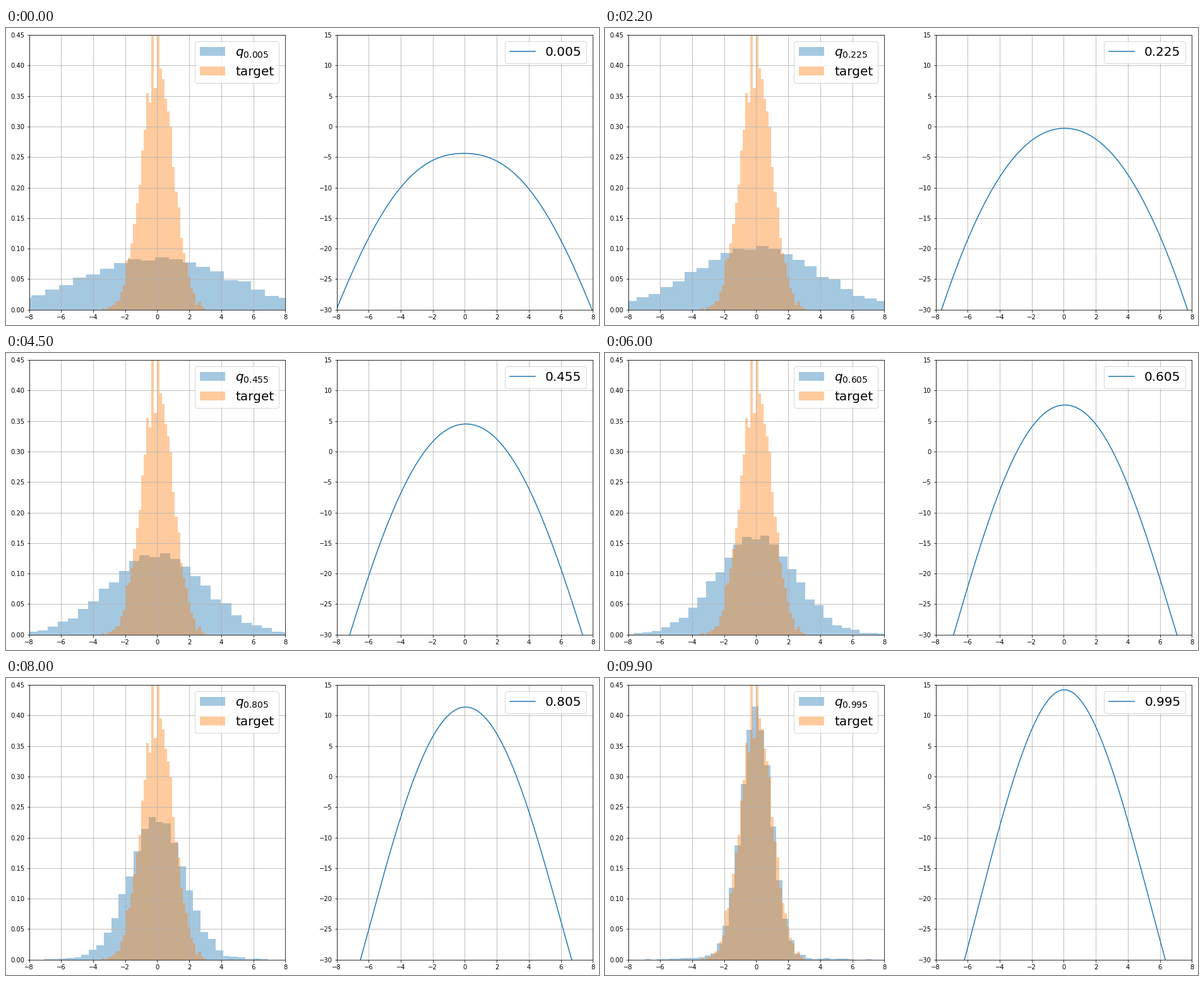
These frames come from a looping animation (939 by 470 pixels, 10000 ms). A matplotlib script:

```python
import numpy as np
import matplotlib.pyplot as plt
from matplotlib.animation import FuncAnimation

W, H, DPI = 939, 470, 72
FRAMES, INTERVAL = 100, 100
AX_W, AX_H, AX_Y = 405.82, 434.88, 24.2
N_SAMPLES = 2000

KEY_TIMES = np.array([0.005, 0.455, 0.715, 0.995])
PEAK = (-4.4, 4.5, 9.75, 14.2)
TILT = (-0.03, 0.1, 0.12, 0.11)
# curvature of the log density at |x| = 2, 4, 6
BEND = ((0.3, 0.67, 1.0, 1.57),
        (0.356, 0.685, 0.98, 1.37),
        (0.39, 0.674, 0.91, 1.155))

xs = np.linspace(-8, 8, 400)


def through(points):
    """Cubic in time through four key values."""
    return np.poly1d(np.polyfit(KEY_TIMES, points, 3))


peak, tilt = through(PEAK), through(TILT)
bend = [through(b) for b in BEND]


def normal(x, sigma):
    return np.exp(-0.5 * (x / sigma) ** 2) / (sigma * np.sqrt(2 * np.pi))


def sampled(h, width, seed, amount=0.4):
    """Roughen bar heights the way a finite sample would."""
    noise = np.random.default_rng(seed).normal(size=len(h))
    return np.maximum(h + amount * np.sqrt(h / (N_SAMPLES * width)) * noise, 0)


def target_bars():
    k = np.arange(40)
    width = 0.1625
    left = -3.448 + width * k
    d = k - 19
    ripple = 0.08 * np.cos(np.pi * d) * np.exp(-np.abs(d) / 1.5)
    h = sampled(normal(left + width / 2, 0.98), width, 3)
    return left, width, np.maximum(h + ripple, 0)


def q_bars(t):
    """The bin grid and the spread both shrink linearly with time."""
    width = 0.86 - 0.49 * t
    left = -0.13 + 0.64 * t + width * np.arange(-23, 23)
    mid = left + width / 2
    sigma = 4.7 - 3.78 * t
    h = 0.96 * normal(mid, sigma) + 0.04 * normal(mid, max(sigma, 3))
    return left, width, sampled(h, width, 8)


def log_density(t):
    c2, c4, c6 = (b(t) for b in bend)
    r = np.abs(xs)
    c = c2 + (c4 - c2) / 2 * (r - 2) + (c6 - 2 * c4 + c2) / 8 * (r - 2) * (r - 4)
    return peak(t) + tilt(t) * xs - c * xs ** 2


def panel(x, ylim, step):
    ax = fig.add_axes([x / W, AX_Y / H, AX_W / W, AX_H / H])
    ax.set(xlim=(-8, 8), ylim=ylim)
    ax.set_xticks(range(-8, 9, 2))
    ax.set_yticks(np.arange(ylim[0], ylim[1] + step / 2, step))
    ax.set_autoscale_on(False)
    ax.grid(True)
    return ax


def draw_bars(bars, color, label):
    left, width, h = bars
    return ax_hist.bar(left, h, width, align="edge", color=color, alpha=0.4,
                       label=label)


def legend_text(ax):
    return ax.legend(fontsize=20, loc="upper right").get_texts()[0]


fig = plt.figure(figsize=(W / DPI, H / DPI), dpi=DPI, facecolor="white")
ax_hist = panel(36.54, (0, 0.45), 0.05)
ax_line = panel(523.52, (-30, 15), 5)

bars = draw_bars(q_bars(0), "C0", "$q_{0.005}$")
draw_bars(target_bars(), "C1", "target")
line, = ax_line.plot(xs, log_density(0), color="C0", label="0.005")
q_text, t_text = legend_text(ax_hist), legend_text(ax_line)


def update(i):
    t = 0.005 + i / FRAMES
    left, width, heights = q_bars(t)
    for bar, x, h in zip(bars, left, heights):
        bar.set_bounds(x, 0, width, h)
    line.set_ydata(log_density(t))
    q_text.set_text(f"$q_{{{t:.3f}}}$")
    t_text.set_text(f"{t:.3f}")
    return [*bars, line, q_text, t_text]


anim = FuncAnimation(fig, update, frames=FRAMES, interval=INTERVAL, repeat=True)
plt.show()
```
